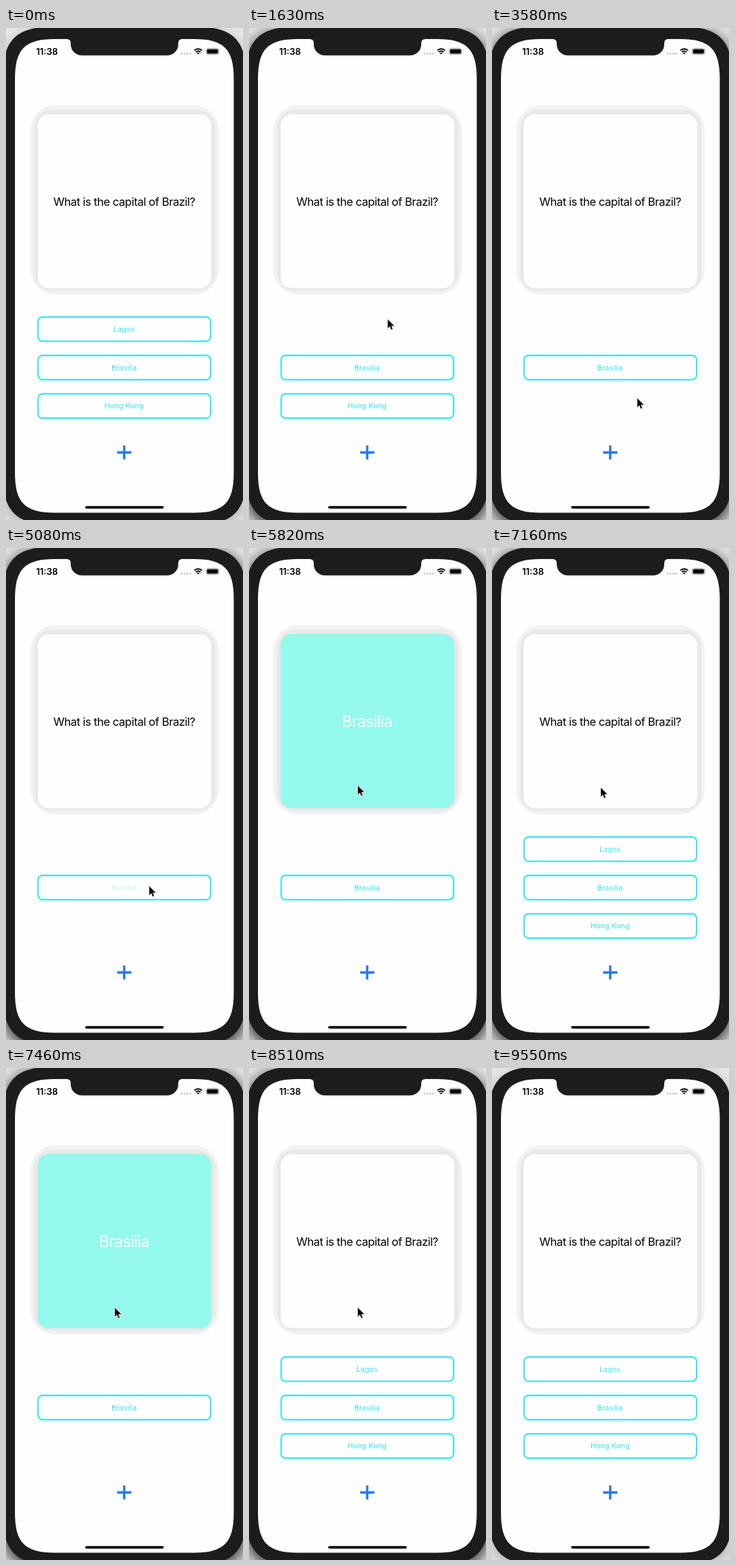
These frames come from a looping animation (344 by 714 pixels, 9650 ms). An HTML page:

```html
<!DOCTYPE html>
<html lang="en">
<head>
<meta charset="utf-8">
<title>Quiz card</title>
<style>
  html, body { margin: 0; width: 100%; height: 100%; overflow: hidden; background: #fff; }
  svg { display: block; width: 344px; height: 714px; }
  text { font-family: Inter, Roboto, sans-serif; text-anchor: middle; }
  .question { font-size: 16.5px; letter-spacing: -.5px; }
  .answer { font-size: 22.6px; letter-spacing: -.5px; fill: #fff; }
  .clock { font-size: 13px; font-weight: 600; }
  .choice rect { fill: none; stroke: #36e8f1; stroke-width: 2.2; }
  .choice text { font-size: 10.8px; fill: #36e8f1; }
  #shadow { filter: blur(14px); }
  #cursor { filter: drop-shadow(.3px .8px .7px rgba(0, 0, 0, .45)); }
</style>
</head>
<body>
<svg viewBox="0 0 344 714">
  <rect width="344" height="714" fill="#ebebeb"/>

  <!-- phone -->
  <path id="shadow" transform="translate(0 7)"/>
  <path id="body" fill="#1c1c1c"/>
  <path id="screen" fill="#fefefe"/>
  <path fill="#1c1c1c" d="M86 15V16H88Q94 16 94 22V23.7A16 16 0 0 0 110 39.7H234A16 16 0 0 0 250 23.7V22Q250 16 256 16H258V15Z"/>

  <!-- status bar -->
  <text class="clock" x="59.5" y="38.5">11:38</text>
  <path d="M255 37.3H268" stroke="#c4c4c4" stroke-width="2.8" stroke-linecap="round" stroke-dasharray="0 4"/>
  <g fill="none" stroke="#000" stroke-width="1.8">
    <path d="M273.4 32.6Q279 27.8 284.6 32.6M275.6 35Q279 32 282.4 35"/>
    <path d="M277.2 36.4Q279 35 280.8 36.4L279 38.4Z" fill="#000" stroke="none"/>
  </g>
  <rect x="290.5" y="29.5" width="18.4" height="9" rx="2.6" fill="none" stroke="#999" stroke-width=".9"/>
  <rect x="291.7" y="30.7" width="16" height="6.6" rx="1.5"/>
  <path d="M309.8 32.5Q311.2 34 309.8 35.5Z" fill="#999"/>

  <!-- card -->
  <rect x="35" y="112" width="274" height="275" rx="37" fill="#f2f2f2"/>
  <rect x="40.5" y="118" width="263.5" height="264" rx="27" fill="#e9e9e9"/>
  <rect x="45.5" y="124.2" width="253" height="253.6" rx="16.5" fill="#e2e2e2"/>
  <rect id="face" x="46" y="125" width="252" height="252.5" rx="16"/>
  <text id="question" class="question" x="171.6" y="257.7">What is the capital of Brazil?</text>
  <text id="answer" class="answer" x="171.5" y="260">Brasilia</text>

  <g id="choices"></g>

  <path d="M161.3 616H182M171.6 605.7V626.3" stroke="#2478f4" stroke-width="3.3"/>
  <rect x="115" y="693.7" width="114" height="3.8" rx="1.9"/>

  <path id="cursor" d="M1 1V13.8L4 11L6 15.7L7.9 14.9L6 10.3H10.2Z" stroke="#fff" stroke-width="1.7" paint-order="stroke"/>
</svg>

<script>
const LOOP = 9650, SAMPLE = 148, HOLD = 300;
const ENTER = 450, LEAVE = 9550;
const $ = id => document.getElementById(id);

// Rectangle with smooth corners that start c away from each corner
function smoothRect(x, y, w, h, c) {
  const k = c * .75;
  return `M${x} ${y + c}c0 ${-k} ${c - k} ${-c} ${c} ${-c}h${w - 2 * c}` +
    `c${k} 0 ${c} ${c - k} ${c} ${c}v${h - 2 * c}` +
    `c0 ${k} ${k - c} ${c} ${-c} ${c}h${2 * c - w}` +
    `c${-k} 0 ${-c} ${k - c} ${-c} ${-c}z`;
}
const body = smoothRect(-5, -2, 354, 723, 76);
$('shadow').setAttribute('d', body);
$('body').setAttribute('d', body);
$('screen').setAttribute('d', smoothRect(13, 16, 317.6, 687.5, 58));

const NAMES = ['Lagos', 'Brasilia', 'Hong Kong'];
const CORRECT = 1, CARD = NAMES.length;
$('choices').innerHTML = NAMES.map((name, i) => `
  <g class="choice" transform="translate(0 ${418.3 + i * 55.75})">
    <rect x="46.6" y="1.1" width="250.4" height="35.2" rx="6.5"/>
    <text x="171.4" y="22.7">${name}</text>
  </g>`).join('');
const choices = [...document.querySelectorAll('.choice')];

const TAPS = [
  { time: 1630, on: 0 }, { time: 3580, on: 2 }, { time: 5230, on: CORRECT },
  { time: 5960, on: CARD }, { time: 7460, on: CARD }, { time: 8510, on: CARD }
];

const HOME = { x: 306, y: 704 };
const MOVES = [
  { start: ENTER, end: 1190, x: 200.5, y: 422 },
  { start: 2380, end: 2830, x: 210, y: 536.5 },
  { start: 4780, end: 5080, x: 207, y: 490 },
  { start: 5230, end: 5820, x: 157, y: 344 },
  { start: 7010, end: 7160, x: 157, y: 347 },
  { start: 8960, end: 9400, ...HOME }
];

// Pointer on a sampled arc: quick in y first, then in x
function pointerAt(t) {
  let { x, y } = HOME;
  for (const move of MOVES) {
    if (t < move.start) break;
    const steps = Math.round((move.end - move.start) / SAMPLE);
    const step = Math.floor((t - move.start) / (move.end - move.start) * steps);
    const p = Math.min(1, (step + 1) / (steps + 1));
    x += (move.x - x) * p * p;
    y += (move.y - y) * (1 - (1 - p) ** 2);
  }
  return { x, y };
}

// Wrong answers vanish, the right one turns the card, the card turns itself
function quizAt(t) {
  let flipped = false, wrong = [];
  for (const { time, on } of TAPS) {
    if (t < time) break;
    if (on === CARD || on === CORRECT) {
      flipped = !flipped;
      wrong = [];
    } else wrong.push(on);
  }
  const pressed = TAPS.find(({ time }) => t >= time - HOLD && t < time)?.on;
  return { flipped, wrong, pressed };
}

const show = (el, on) => el.setAttribute('visibility', on ? 'visible' : 'hidden');

function draw(t) {
  const { x, y } = pointerAt(t);
  const { flipped, wrong, pressed } = quizAt(t);
  const focused = t >= TAPS[0].time - HOLD && t < LEAVE;

  $('shadow').setAttribute('opacity', focused ? .95 : .3);
  $('face').setAttribute('fill', flipped ? '#93faed' : '#fefefe');
  show($('question'), !flipped);
  show($('answer'), flipped);
  choices.forEach((choice, i) => {
    show(choice, flipped ? i === CORRECT : !wrong.includes(i));
    choice.lastElementChild.setAttribute('opacity', i === pressed ? .3 : 1);
  });
  show($('cursor'), t >= ENTER && t < LEAVE);
  $('cursor').setAttribute('transform', `translate(${x} ${y})`);
}

const start = performance.now();
function tick() {
  draw((performance.now() - start) % LOOP);
  requestAnimationFrame(tick);
}
tick();
</script>
</body>
</html>
```
